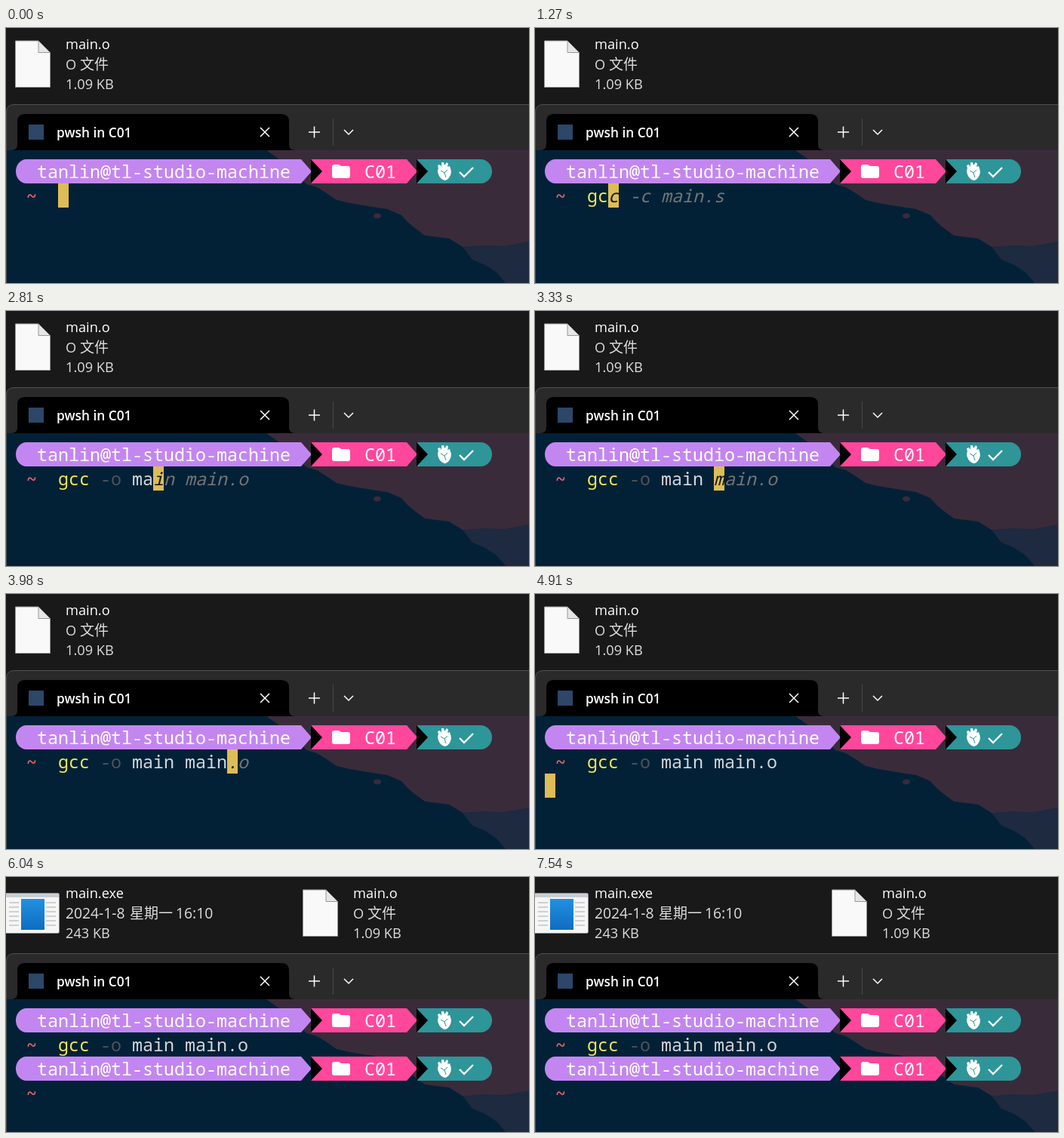
Recreate the animation shown at these times as an HTML page. Size 693x338 px, loop 7.57 s.

```html
<!DOCTYPE html>
<html lang="en">
<head>
<meta charset="utf-8">
<title>Linking an object file</title>
<style>
  html, body { margin: 0; width: 100%; height: 100%; overflow: hidden; background: #191919; }
  svg { display: block; }
  text { white-space: pre; }
  .ui { font: 18.2px "Open Sans", "Noto Sans CJK SC", "Noto Sans CJK", sans-serif; fill: #fff; }
  .dim { fill: #dedede; }
  .date { font-size: 19.3px; }
  .cjk { font-size: 19px; }
  .tab { font-size: 17.3px; font-weight: 600; }
  .mono { font: 500 23.333px "Noto Sans Mono", "DejaVu Sans Mono", monospace; fill: #d2d8d8; }
  .prompt { fill: #fff; }
  .command { fill: #f3e94f; }
  .option { fill: #505257; }
  .hint { fill: #757575; font-style: italic; }
  .under { fill: #15191c; font-style: italic; }
  .tilde { fill: #e0626f; font-weight: 700; }
  .line { fill: none; stroke: #fff; stroke-width: 1.5; }
</style>
</head>
<body>
<svg width="693" height="338" viewBox="0 0 693 338">
  <defs>
    <linearGradient id="blue" x2="0" y2="1">
      <stop stop-color="#2290e0"/>
      <stop offset="1" stop-color="#0f6cc0"/>
    </linearGradient>
    <g id="page">
      <path d="M.5 .5H31L46.500 16V62H.5Z" fill="#f9f9f9" stroke="#989898"/>
      <path d="M31 .5V16H46.500Z" fill="#e6e6e6" stroke="#989898"/>
    </g>
    <g id="objectFile">
      <use href="#page" x="12" y="16.500"/>
      <text class="ui" x="79" y="28">main.o</text>
      <text class="ui dim" x="79" y="55">O <tspan class="cjk">文件</tspan></text>
      <text class="ui dim" x="79" y="81">1.09 KB</text>
    </g>
    <g id="prompt">
      <path d="M27 0H391L405 16L391 32H27A14 16 0 0 1 27 0Z" fill="#c386f1"/>
      <path d="M404 0H531L545 16L531 32H404Z" fill="#ff479c"/>
      <path d="M545 0H629A15 16 0 0 1 629 32H545Z" fill="#2e9599"/>
      <path d="M404 0L419 16L404 32ZM544 0L559 16L544 32Z" fill="#000"/>
      <text class="mono prompt" x="41" y="25">tanlin@tl-studio-machine</text>
      <path d="M435 7H441L444 9H453Q456 9 456 12V22Q456 25 453 25H435Q432 25 432 22V10Q432 7 435 7Z" fill="#fff"/>
      <text class="mono prompt" x="475" y="25">C01</text>
      <path d="M573 12L572 8L575 7L577 10L577 4H580L581 8L584 4L586 6L585 10L588 9L589 12Q591 18 588 23Q585 28 581 28Q575 26 573 20Q571 15 573 12Z" fill="#fff"/>
      <path d="M576 15L581 18L583 24M581 18L585 14" fill="none" stroke="#2e9599"/>
      <path d="M601 17L607 23L619 11" fill="none" stroke="#fff" stroke-width="2.400"/>
      <text class="mono tilde" x="27" y="57">~</text>
    </g>
  </defs>

  <rect width="693" height="338" fill="#191919"/>
  <use id="objectItem" href="#objectFile"/>
  <g id="programItem">
    <rect x="-2" y="21.500" width="72.500" height="53" rx="2" fill="#f6f6f6" stroke="#8e8e8e"/>
    <path d="M0 24.500H70" stroke="#c9ced3" stroke-width="5"/>
    <path d="M4 34H17M4 40H17M4 46H17M4 52H17M4 58H17M4 64H17M53 34H66M53 40H66M53 46H66M53 52H66M53 58H66M53 64H66" stroke="#c4c4c4" stroke-width="1.500"/>
    <rect x="20" y="29" width="31" height="41" fill="url(#blue)"/>
    <text class="ui" x="79" y="28">main.exe</text>
    <text class="ui dim date" x="79" y="55">2024-1-8</text>
    <text class="ui dim cjk" x="164" y="55">星期一</text>
    <text class="ui dim date" x="225" y="55">16:10</text>
    <text class="ui dim" x="79" y="81">243 KB</text>
  </g>

  <path d="M.5 340V112Q.5 101.500 11 101.500H695V340Z" fill="#2a2a2a" stroke="#505050"/>
  <path d="M7 162Q15 162 15 154V124Q15 114 25 114H365Q375 114 375 124V154Q375 162 383 162Z" fill="#000"/>
  <rect x="30" y="128" width="20" height="20" fill="#2c4768"/>
  <text class="ui tab" x="67" y="145">pwsh in C01</text>
  <path class="line" d="M337 132L349 144M349 132L337 144M401 138H416M408.500 130.500V145.500M448 135L454 141L460 135"/>
  <path d="M433.500 120V156" stroke="#484848"/>

  <rect x="1" y="162" width="692" height="176" fill="#022137"/>
  <path d="M345 162L362 174L385 194L398 207L412 211L425 219L438 228L455 232L485 237L505 240L524 248L532 257L539 263L555 275L587 279L605 290L693 300V162Z" fill="#3a2b3a"/>
  <ellipse cx="492" cy="249" rx="5" ry="3.500" fill="#3a2b3a"/>
  <path d="M605 290L632 288L660 289L693 283V338H662L650 324L635 314L618 307Z" fill="#1d2a3f"/>

  <use href="#prompt" y="174"/>
  <use id="nextPrompt" href="#prompt" y="238"/>
  <rect id="cursor" width="14" height="32" fill="#ddbd57"/>
  <text class="mono" x="69" y="231"><tspan class="command" id="command"></tspan><tspan id="option"></tspan><tspan id="args"></tspan><tspan class="under" id="under"></tspan><tspan class="hint" id="hint"></tspan></text>
</svg>
<script>
const LOOP = 7570, CELL = 14, START_X = 69;
const ENTER = 4910, FINISHED = 5030, FILE_CREATED = 6040;
const COMMAND = "gcc -o main main.o", OLD_COMMAND = "gcc -c main.s";
const keyTimes = [1080, 1270, 1410, 1540, 1830, 2160, 2430, 2710, 2810, 2910,
                  2990, 3330, 3790, 3850, 3910, 3980, 4210, 4440];
const blinkTimes = [140, 690, 5550, 6090, 6660, 7180, 7540];

const el = id => document.getElementById(id);
const passed = (times, t) => times.filter(time => time <= t).length;
const show = (id, visible) => el(id).setAttribute("visibility", visible ? "visible" : "hidden");

function setText(id, value) {
  if (el(id).textContent !== value) el(id).textContent = value;
}

function placeCursor(t, typed) {
  let x = START_X + typed * CELL, y = 206;
  if (t >= FINISHED) [x, y] = [START_X, 270];
  else if (t >= ENTER) [x, y] = [13, 238];
  el("cursor").setAttribute("x", x);
  el("cursor").setAttribute("y", y);
  show("cursor", passed(blinkTimes, t) % 2 === 0);
}

function render(t) {
  const typed = passed(keyTimes, t);
  const input = COMMAND.slice(0, typed);
  const suggestion = typed === 0 ? "" : (typed < 6 ? OLD_COMMAND : COMMAND).slice(typed);

  setText("command", input.slice(0, 3));
  setText("option", input.slice(3, 6));
  setText("args", input.slice(6));
  setText("under", suggestion.slice(0, 1));
  setText("hint", suggestion.slice(1));
  el("option").setAttribute("class", typed >= 6 ? "option" : "");
  placeCursor(t, typed);

  show("nextPrompt", t >= FINISHED);
  show("programItem", t >= FILE_CREATED);
  el("objectItem").setAttribute("x", t >= FILE_CREATED ? 381 : 0);
}

const began = performance.now();
function tick() {
  render((performance.now() - began) % LOOP);
  requestAnimationFrame(tick);
}
tick();
</script>
</body>
</html>
```
